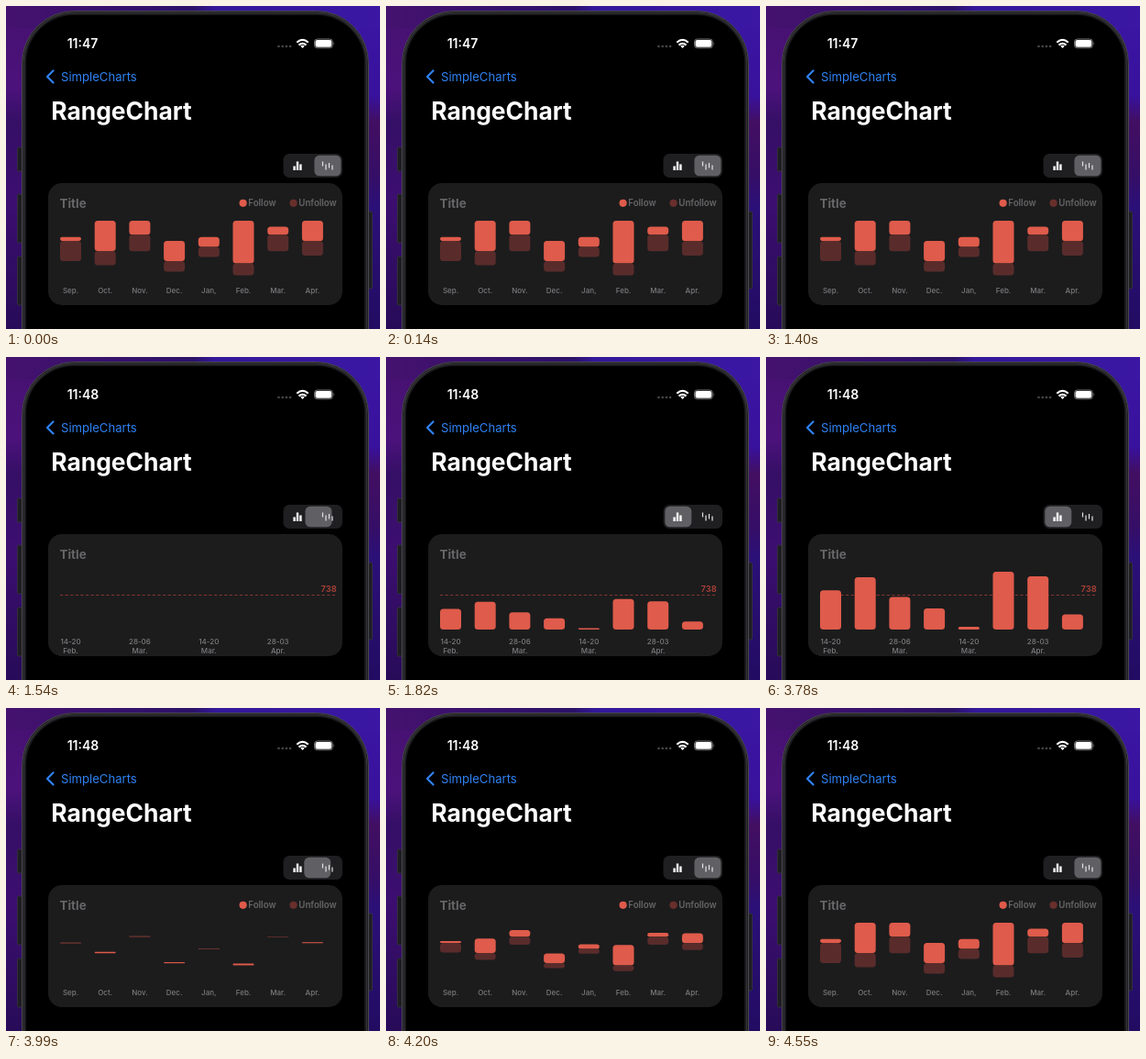
An HTML page that plays this animation: 408 by 352 pixels, repeating every 6650 ms.

```html
<!DOCTYPE html>
<html lang="en">
<head>
<meta charset="utf-8">
<title>RangeChart</title>
<style>
  html, body { margin: 0; width: 100%; height: 100%; overflow: hidden; background: #000; }
  svg { display: block; width: 408px; height: 352px; font-family: Inter, Roboto, sans-serif; }
  .bold { font-weight: 700; }
  .semi { font-weight: 600; }
  .grey { fill: #666668; }
  .label { font-size: 8px; font-weight: 500; fill: #7b7b7e; text-anchor: middle; }
</style>
</head>
<body>
<svg viewBox="0 0 408 352">
  <defs>
    <linearGradient id="left" x2="0" y2="1">
      <stop offset="0" stop-color="#45116f"/>
      <stop offset=".25" stop-color="#4c127c"/>
      <stop offset=".36" stop-color="#350f66"/>
      <stop offset=".6" stop-color="#3c0e70"/>
      <stop offset="1" stop-color="#270b58"/>
    </linearGradient>
    <linearGradient id="top">
      <stop offset="0" stop-color="#45116f"/>
      <stop offset=".5" stop-color="#2c1268"/>
      <stop offset=".56" stop-color="#33189a"/>
      <stop offset="1" stop-color="#3b17a4"/>
    </linearGradient>
    <linearGradient id="right" x2="0" y2="1">
      <stop offset="0" stop-color="#3b17a4"/>
      <stop offset=".28" stop-color="#38119c"/>
      <stop offset=".36" stop-color="#420f62"/>
      <stop offset=".52" stop-color="#360e66"/>
      <stop offset=".62" stop-color="#2b1078"/>
      <stop offset="1" stop-color="#220c62"/>
    </linearGradient>
  </defs>

  <rect width="204" height="352" fill="url(#left)"/>
  <rect x="204" width="204" height="352" fill="url(#right)"/>
  <rect width="408" height="24" fill="url(#top)"/>

  <g fill="#1e1d22" stroke="#37363d" stroke-width=".8">
    <rect x="12.5" y="154" width="7" height="26" rx="1.5"/>
    <rect x="12.5" y="205" width="7" height="53" rx="1.5"/>
    <rect x="12.5" y="273" width="7" height="53" rx="1.5"/>
    <rect x="392" y="224" width="7.5" height="84" rx="1.5"/>
  </g>
  <rect x="17.5" y="5.5" width="378" height="500" rx="57" fill="#19191c" stroke="#4a494f"/>
  <rect x="19.5" y="7.5" width="374" height="500" rx="55" fill="none" stroke="#333336" stroke-width="1.5"/>
  <rect x="22" y="10" width="369" height="500" rx="52"/>

  <text id="clock" class="semi" x="66.7" y="46" font-size="14" fill="#fff"></text>
  <g fill="#48484a">
    <circle cx="297.5" cy="44" r="1.3"/><circle cx="301.7" cy="44" r="1.3"/>
    <circle cx="305.9" cy="44" r="1.3"/><circle cx="310.1" cy="44" r="1.3"/>
  </g>
  <g fill="none" stroke="#fff" stroke-width="2.2">
    <path d="M317.3 39.7Q323.5 34.2 329.7 39.7M319.5 42.6Q323.5 39 327.5 42.6"/>
    <path d="M321.3 43.7Q323.5 42 325.7 43.7L323.5 46Z" fill="#fff" stroke="none"/>
  </g>
  <rect x="336.5" y="36" width="19.8" height="9.8" rx="3" fill="none" stroke="#777"/>
  <rect x="337.5" y="37" width="17.8" height="7.8" rx="2" fill="#fff"/>
  <path d="M357.6 39.3Q359.2 41 357.6 42.7Z" fill="#777"/>

  <path d="M51.5 70.5L45 77L51.5 83.5" fill="none" stroke="#2f82f3" stroke-width="2.2" stroke-linecap="round" stroke-linejoin="round"/>
  <text x="60" y="81.7" font-size="13.1" fill="#2f82f3">SimpleCharts</text>
  <text class="bold" x="49.2" y="124" font-size="26.4" fill="#fff">RangeChart</text>

  <rect x="302.5" y="161" width="64.5" height="26" rx="6.5" fill="#1f1f21"/>
  <rect id="thumb" y="162.7" width="29" height="22.6" rx="5.5" fill="#606064"/>
  <path d="M314.6 174.5V179M318 169.5V179M321.4 172.5V179" stroke="#fff" stroke-width="2.4"/>
  <path d="M345.5 169.5V174.5M349 172.5V178.5M352.5 171V176.5M356 173.5V178.5" stroke="#e4e4e6" stroke-width="1.2"/>

  <rect x="46" y="193" width="321" height="133" rx="15" fill="#1c1c1d"/>
  <text class="bold grey" x="58.5" y="220" font-size="13.4">Title</text>

  <g id="range">
    <g class="semi grey" font-size="9.7">
      <circle cx="258.6" cy="214.8" r="4.1" fill="#df5b4b"/>
      <text x="264.3" y="218.3">Follow</text>
      <circle cx="313.6" cy="214.8" r="4.1" fill="#682f2c"/>
      <text x="319.3" y="218.3">Unfollow</text>
    </g>
  </g>
  <g id="bars">
    <path d="M59 259.5H361" stroke="#87352f" stroke-dasharray="3.2 2.4"/>
    <text class="semi" x="360.7" y="256" font-size="9.3" fill="#ab4238" text-anchor="end">738</text>
  </g>
</svg>
<script>
  const LOOP = 6650, TO_BARS = 1400, TO_RANGE = 3780;
  const RED = '#df5b4b', DARK = '#592c2b';
  const $ = id => document.getElementById(id);
  const months = ['Sep.', 'Oct.', 'Nov.', 'Dec.', 'Jan,', 'Feb.', 'Mar.', 'Apr.'];
  const weeks = [['14-20', 'Feb.'], ['28-06', 'Mar.'], ['14-20', 'Mar.'], ['28-03', 'Apr.']];
  // [join, height above, height below]
  const ranges = [[256, 4.3, 22], [267, 33, 15.5], [249.3, 15.3, 18], [278, 22, 11.5],
                  [262.5, 10.7, 11], [280.5, 46.5, 13], [249.3, 8.8, 18], [256.2, 22.2, 15.8]];
  const values = [42.7, 57, 35.5, 23, 3, 63, 58, 16.5];
  const barX = i => 59 + i * 37.7;

  function add(parent, tag, attrs, text = '') {
    const el = document.createElementNS('http://www.w3.org/2000/svg', tag);
    for (const key in attrs) el.setAttribute(key, attrs[key]);
    el.textContent = text;
    return parent.appendChild(el);
  }
  const addBar = (parent, i, fill) => add(parent, 'rect', { x: barX(i), width: 23, fill });
  const addLabel = (parent, i, y, text) =>
    add(parent, 'text', { class: 'label', x: barX(i) + 11.5, y }, text);

  function setBar(el, top, height) {
    el.setAttribute('y', top);
    el.setAttribute('height', height);
    el.setAttribute('rx', Math.min(3.5, height / 2));
  }

  const rangeBars = ranges.map((_, i) => [addBar($('range'), i, RED), addBar($('range'), i, DARK)]);
  const valueBars = values.map((_, i) => addBar($('bars'), i, RED));
  months.forEach((name, i) => addLabel($('range'), i, 313, name));
  weeks.forEach((lines, i) => lines.forEach((s, row) => addLabel($('bars'), i * 2, 313 + row * 10, s)));

  function ease(t, start, duration) {
    const p = Math.min(1, Math.max(0, (t - start) / duration));
    return p * p * (3 - 2 * p);
  }

  function draw(t) {
    const showBars = t >= TO_BARS + 130 && t < TO_RANGE + 140;
    $('bars').style.display = showBars ? '' : 'none';
    $('range').style.display = showBars ? 'none' : '';
    $('clock').textContent = t < TO_BARS + 70 ? '11:47' : '11:48';
    $('thumb').setAttribute('x',
      336.4 - 32.1 * (ease(t, TO_BARS + 30, 300) - ease(t, TO_RANGE + 30, 300)));

    const grow = ease(t, TO_BARS + 130, 560);
    valueBars.forEach((el, i) => setBar(el, 297 - values[i] * grow, values[i] * grow));

    const spread = t < TO_RANGE ? 1 : ease(t, TO_RANGE + 140, 580);
    ranges.forEach(([join, up, down], i) => {
      setBar(rangeBars[i][0], join - up * spread, up * spread);
      setBar(rangeBars[i][1], join, down * spread);
    });
  }

  const start = performance.now();
  function frame() {
    draw((performance.now() - start) % LOOP);
    requestAnimationFrame(frame);
  }
  frame();
</script>
</body>
</html>
```
